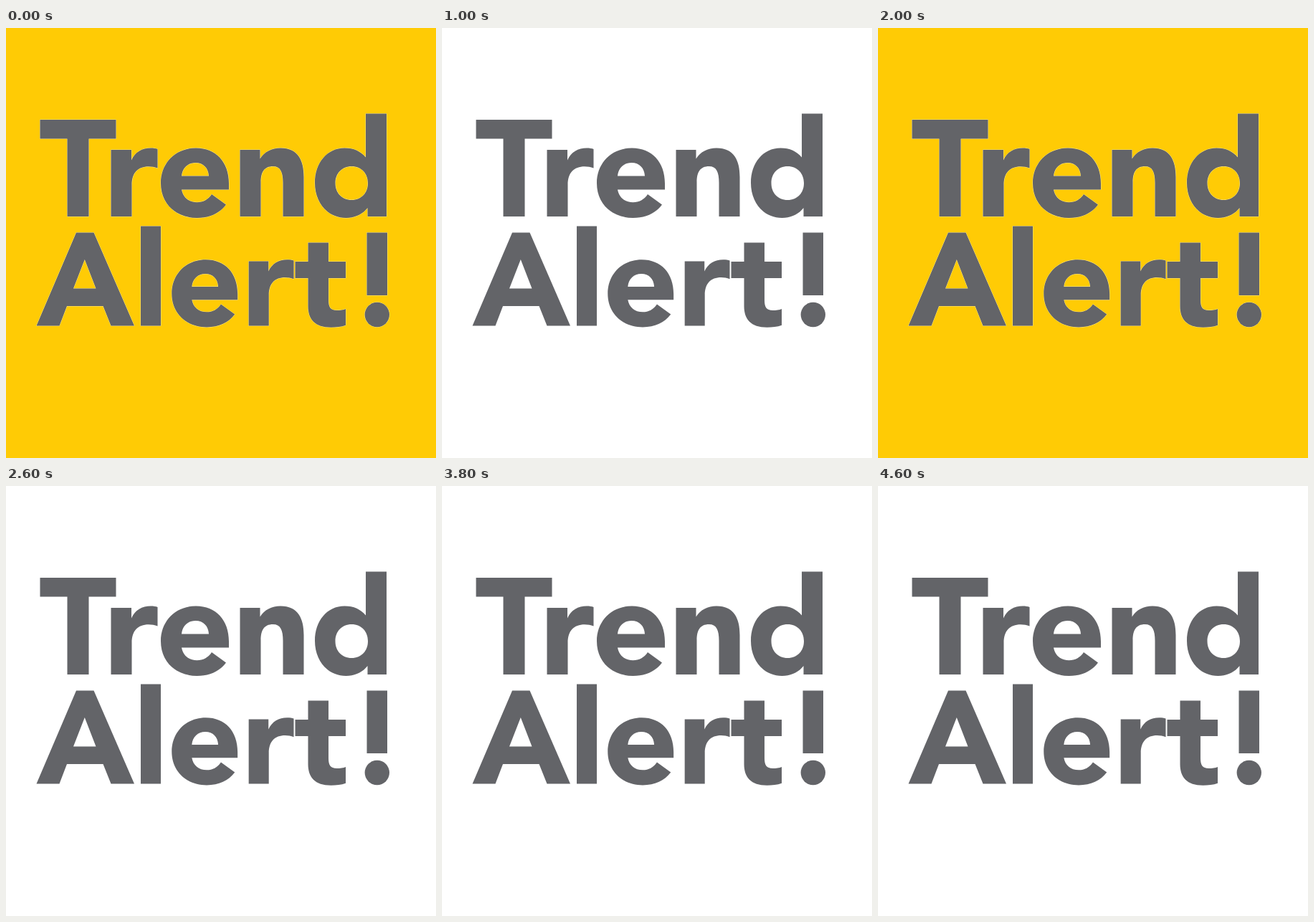
Animation, 600 px wide and 600 px high, one loop 4800 ms. Source, as an HTML page:

```html
<!DOCTYPE html>
<html lang="en">
<head>
<meta charset="utf-8">
<title>Trend Alert!</title>
<style>
  html, body { margin: 0; width: 100%; height: 100%; overflow: hidden; }
  body { animation: flash 400ms step-end infinite; }
  svg { display: block; width: 100vw; height: 100vh; }
  path, circle {
    fill: #636468;
    fill-rule: evenodd;
    stroke: rgba(255, 255, 255, .6);
    stroke-width: .9px;
    paint-order: stroke;
  }
  @keyframes flash {
    0%, 100% { background: #ffcb05; }
    50% { background: #fff; }
  }
</style>
</head>
<body>
<svg viewBox="0 0 600 600" role="img" aria-label="Trend Alert!">
  <defs>
    <path id="r" d="M146.5 170H175V184.5C180 173 190 167.5 202 167.5C206 167.5 209 168 211.5 169V195.5C207.5 194 203.5 193.3 199 193.3C184 193.3 175.5 202 175.5 219V263H146.5Z"/>
    <path id="e" d="M311 225.5H245C247 236.5 255 243.2 266.5 243.2C275 243.2 282 239.5 287 232L307 246.5C298 258.5 284 265 266.5 265C237 265 216 245 216 216.5C216 188 237 167.5 265 167.5C293 167.5 311 187 311 217Z
      M245 206.5H283C282.5 195.5 275.5 188 264.5 188C253.5 188 246 195.5 245 206.5Z"/>
  </defs>

  <!-- Trend -->
  <path d="M47.5 128H153.5V154.5H115.5V263H85.5V154.5H47.5Z"/>
  <use href="#r"/>
  <use href="#e"/>
  <path d="M326.5 170H354.5V182.5C360 173 371 167.5 383 167.5C407 167.5 415.5 184 415.5 208V263H386.5V216C386.5 201 383 193 372.5 193C360 193 355.5 201.5 355.5 215V263H326.5Z"/>
  <path d="M502 119.5H531V263H504.5V251C498 259.5 487 265 474.5 265C449 265 431 244 431 216C431 188.5 448 167.5 472.5 167.5C485 167.5 495 172 502 180.5Z
    M459.5 216.5C459.5 230 468.5 240 482.3 240C496 240 505 230 505 216.5C505 203 496 193 482.3 193C468.5 193 459.5 203 459.5 216.5Z"/>

  <!-- Alert! -->
  <path d="M98 285.5H122.5L179 415.5H146.5L135.5 388H85L74.5 415.5H42.5Z M109.8 323L94 363.5H125.5Z"/>
  <path d="M188 276.5H216V415.5H188Z"/>
  <use href="#e" transform="translate(22.4 161.2) scale(.967)"/>
  <use href="#r" transform="translate(197 161.2) scale(.967)"/>
  <path d="M421.5 299.5H450V326H474V349H450V380C450 389 452.5 394 461.5 394C466 394 471 393.5 474 392V414.8C468 417 460.5 417.7 453.5 417.7C431 417.7 421.5 406.5 421.5 388V349H403.5V326H421.5Z"/>
  <path d="M503.5 285.5H532V373H503.5Z"/>
  <circle cx="517.8" cy="400" r="17.2"/>
</svg>
</body>
</html>
```
